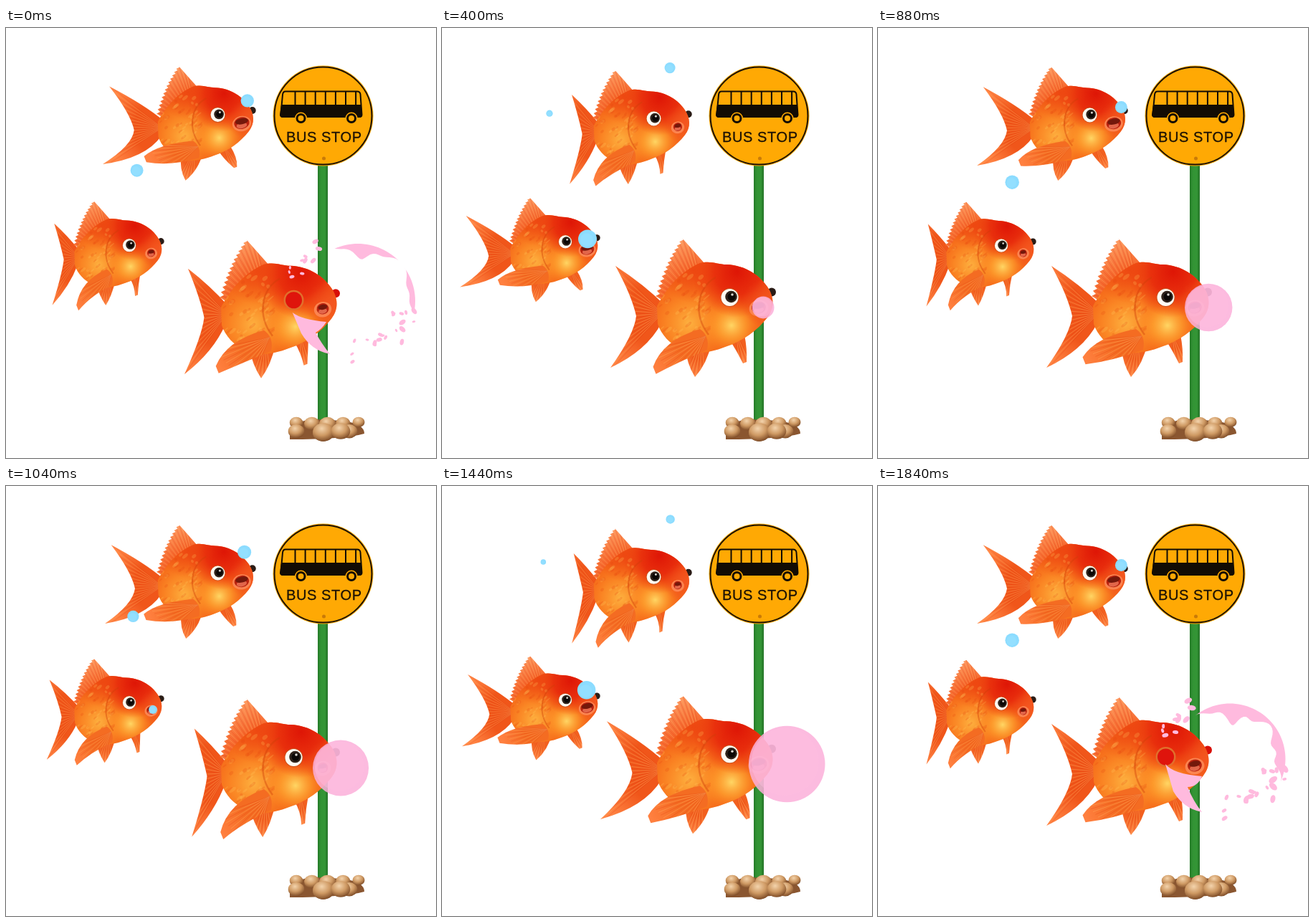
Recreate the animation shown at these times as an HTML page with a canvas. Size 600 px wide and 600 px high, loop 1.92 s.

```html
<!DOCTYPE html>
<html lang="en">
<head>
<meta charset="utf-8">
<title>Goldfish at the bus stop</title>
<style>
  html, body { margin: 0; width: 100%; height: 100%; overflow: hidden; background: #fff; }
  svg, canvas { position: absolute; left: 0; top: 0; width: 600px; height: 600px; }
  text { font: 20px "Liberation Sans", Arial, sans-serif; letter-spacing: .6px; }
</style>
</head>
<body>
<svg viewBox="0 0 600 600">
  <defs>
    <linearGradient id="green">
      <stop offset="0" stop-color="#257a28"/>
      <stop offset=".3" stop-color="#329334"/>
      <stop offset=".7" stop-color="#349636"/>
      <stop offset="1" stop-color="#227025"/>
    </linearGradient>
    <radialGradient id="stone" cx=".42" cy=".3" r=".75">
      <stop offset="0" stop-color="#f3d3ac"/>
      <stop offset=".5" stop-color="#cf9a64"/>
      <stop offset="1" stop-color="#74421f"/>
    </radialGradient>
  </defs>
  <rect x="435" y="190" width="14" height="362" fill="url(#green)"/>
  <g id="rocks" fill="url(#stone)"></g>
  <circle cx="442.5" cy="122.5" r="70" fill="#ffa904"/>
  <circle cx="442.5" cy="122.5" r="68" fill="none" stroke="#1c1204" stroke-width="2"/>
  <g fill="none" stroke="#120c04" stroke-width="2">
    <path d="M390 88.500H490q4 0 4.500 4L496.500 121q0 3-4 3H387q-4 0-3.500-4L386 93q.5-4.500 4-4.500Z"/>
    <path d="M384 107H495.500L497 122q0 3-4 3H386q-4 0-4-4Z" fill="#120c04" stroke="none"/>
    <path id="windows"/>
  </g>
  <g id="wheels" fill="#ffa904" stroke="#120c04"></g>
  <text x="391" y="158.500" fill="#1c1204" stroke="#1c1204" stroke-width=".3">BUS STOP</text>
  <circle cx="443.500" cy="182" r="2.500" fill="#c97a08"/>
</svg>
<canvas id="stage" width="600" height="600"></canvas>
<script>
const LOOP = 1920, STEP = 80, BEAT = 960, TAU = Math.PI * 2;
const ctx = document.getElementById('stage').getContext('2d');
const wave = t => Math.cos(TAU * t / BEAT);
const put = (id, html) => { document.getElementById(id).innerHTML = html; };

function seeded(seed) {
  return (low = 0, high = 1) => {
    seed = (seed * 16807) % 2147483647;
    return low + (high - low) * seed / 2147483647;
  };
}

function rockRow(y, from, to, count, size) {
  let row = '';
  for (let i = 0; i < count; i++) {
    const x = from + (to - from) * i / (count - 1);
    const r = size - Math.abs(x - 443) / 14;
    row += `<ellipse cx="${x}" cy="${y - Math.abs(x - 443) / 16}" rx="${r}" ry="${r * .85}"/>`;
  }
  return row;
}
put('rocks', '<path d="M396 568Q404 546 430 546L470 548Q500 552 500 566Q470 574 396 574Z" fill="#8a5630"/>' +
  rockRow(553, 405, 492, 5, 12) + rockRow(565, 405, 479, 3, 14) + rockRow(564, 443, 467, 2, 15));

let bars = '';
for (let i = 0; i < 7; i++) bars += `M${403.5 + i * 14.1} 88V108`;
document.getElementById('windows').setAttribute('d', bars);
put('wheels', [411.5, 482].map(x =>
  `<circle cx="${x}" cy="126" r="8.500" stroke="none"/><circle cx="${x}" cy="126" r="5.500" stroke-width="3"/>`).join(''));

// All fish share one drawing, laid out around an eye at EYE.
const EYE = [401.5, 376];
const school = [
  { x: 295.5, y: 124, size: .825, peak: 0 },
  { x: 172, y: 301, size: .755, peak: 400 },
  { x: 401.5, y: 376, size: 1, peak: 640 },
];
const body = new Path2D('M300 388C311 367 330 341 360 328C375 324 385 330 397 330C424 331 444 346 454 361' +
  'C463 374 465 390 454 404C440 422 420 437 395 445C375 453 350 457 335 449C318 441 306 428 301 413Z');
const dorsal = new Path2D(dorsalPath());

function dorsalPath() {
  let d = 'M366 328Q350 310 335 293';
  for (let i = 1; i <= 13; i++) {
    const s = i / 13, r = 1 - s;
    const x = r * r * 335 + 2 * r * s * 310 + s * s * 298;
    const y = r * r * 293 + 2 * r * s * 327 + s * s * 374;
    d += `L${x + 6} ${y - 3}L${x} ${y}`;
  }
  return d + 'L308 380L345 350Z';
}

function disc(x, y, r, color) {
  ctx.fillStyle = color;
  ctx.beginPath();
  ctx.arc(x, y, Math.max(r, 0), 0, TAU);
  ctx.fill();
}

function oval(x, y, rx, ry, turn, color) {
  ctx.fillStyle = color;
  ctx.beginPath();
  ctx.ellipse(x, y, rx, ry, turn, 0, TAU);
  ctx.fill();
}

function glow(x, y, r, ...stops) {
  const g = ctx.createRadialGradient(x, y, 0, x, y, r);
  stops.forEach((c, i) => g.addColorStop(i / (stops.length - 1), c));
  return g;
}

// A fin with rays running from its root to points between two edges.
function fin(path, [rx, ry], reach, a, b, rays, inner = '#f2601f', outer = '#ff8a4a') {
  ctx.save();
  ctx.fillStyle = glow(rx, ry, reach, inner, inner, outer);
  ctx.fill(path);
  ctx.clip(path);
  ctx.lineWidth = 1;
  for (let i = 0; i <= rays; i++) {
    const s = i / rays;
    ctx.strokeStyle = i % 2 ? 'rgba(255,190,110,.35)' : 'rgba(220,60,14,.3)';
    ctx.beginPath();
    ctx.moveTo(rx, ry);
    ctx.lineTo(a[0] + (b[0] - a[0]) * s, a[1] + (b[1] - a[1]) * s);
    ctx.stroke();
  }
  ctx.restore();
}

function drawTail(u) {
  const up = [242 - 24 * u, 332 - 4 * u], low = [235 - 28 * u, 474 - 14.5 * u], notch = 271 - 11 * u;
  fin(new Path2D(`M310 386Q${282 - 6 * u} 358 ${up}Q${notch - 6} 374 ${notch} 402` +
    `Q${notch - 3} 428 ${low}Q${286 - 7 * u} 450 306 412Z`),
    [308, 398], 95, [up[0] - 8, up[1] - 8], [low[0] - 8, low[1] + 12], 26, '#f0561a', '#ff8444');
}

function drawBody() {
  const random = seeded(11);
  ctx.save();
  ctx.fillStyle = '#f4661a';
  ctx.fill(body);
  ctx.clip(body);
  const shade = (...spot) => { ctx.fillStyle = glow(...spot); ctx.fillRect(290, 315, 185, 150); };
  shade(345, 412, 62, 'rgba(255,190,70,.85)', 'rgba(255,160,45,.55)', 'rgba(255,140,30,0)');
  shade(404, 415, 40, 'rgba(255,214,100,1)', 'rgba(255,170,50,.65)', 'rgba(255,140,30,0)');
  shade(412, 340, 64, 'rgba(222,22,6,1)', 'rgba(230,36,10,.85)', 'rgba(235,50,10,0)');
  shade(350, 338, 46, 'rgba(235,60,14,.7)', 'rgba(235,60,14,0)');
  shade(452, 384, 34, 'rgba(244,84,34,.9)', 'rgba(240,74,26,0)');
  for (let i = 0; i < 70; i++) {
    oval(random(305, 372), random(345, 440), random(2, 6), random(1, 3), -.7,
      i % 2 ? 'rgba(255,205,95,.22)' : 'rgba(222,62,12,.2)');
  }
  ctx.strokeStyle = 'rgba(205,60,8,.4)';
  ctx.lineWidth = 2.5;
  ctx.stroke(new Path2D('M382 348C356 362 350 400 372 428'));
  ctx.restore();
}

function drawMouth(open) {
  const part = (dy, rx, ry, color) => oval(442, 390 + dy, rx, ry, -.2, color);
  part(1, 11 + 5 * open, 10 + 3 * open, '#fb8450');
  part(0, 7 + 6 * open, 7 + 3 * open, '#b8220f');
  part(3 + open, 5 + 4 * open, 3 + 2 * open, '#e2664a');
  part(-2 - open, 5 + 6 * open, 3 + 2 * open, '#74180b');
}

function drawEye(shut) {
  const [x, y] = EYE;
  if (shut) {
    disc(x, y + 2, 14, '#e0702c');
    disc(x, y + 2, 11.5, '#df140c');
    return;
  }
  disc(x, y, 13, '#c9521c');
  disc(x, y, 12, '#fffaf2');
  disc(x + 2, y - 1, 8.3, '#30231b');
  disc(x + 2.5, y - 1, 5.5, '#0c0806');
  disc(x + 3.5, y - 4, 1.8, '#d8d2cc');
}

function drawFish({ x, y, size, peak }, t, shut) {
  const u = wave(t - peak), v = wave(t - peak - 50);
  ctx.save();
  ctx.translate(x, y);
  ctx.scale(size, size);
  ctx.translate(-EYE[0], -EYE[1] - 3.5 * u);

  drawTail(u);
  fin(dorsal, [372, 400], 120, [345, 280], [280, 372], 28, '#f45c20', '#ffa36c');

  const side = [425 + 9 * u, 466 - 2 * u];
  fin(new Path2D(`M402 436Q412 452 ${side[0] - 5} ${side[1] + 2}L${side}Q${side[0] + 1} 448 422 428Z`),
    [410, 425], 46, [side[0] - 12, side[1] + 4], [side[0] + 6, side[1]], 6);
  const low = [353 - 6 * u, 487];
  fin(new Path2D(`M340 446Q${341 - 5 * u} 468 ${low}Q370 468 376 440Z`),
    [362, 435], 55, [low[0] - 16, low[1]], [low[0] + 14, low[1]], 9);

  disc(460, 368.5, 6, shut ? '#d80f08' : '#2a1c16');
  drawBody();

  const tip = [291 - 14 * v, 472 - 21 * v];
  fin(new Path2D(`M360 420Q${306 - 6 * v} ${433 - 8 * v} ${tip[0] - 1} ${tip[1] - 6}L${tip[0] + 3} ${tip[1] + 4}` +
    `Q${327 - 3 * v} ${466 - 3 * v} 370 449Q374 430 360 420Z`),
    [368, 430], 85, [tip[0] - 4, tip[1] - 30], [tip[0] + 45, tip[1] + 24], 14, '#f46c22', '#ff8040');

  drawMouth((1 + u) / 2);
  drawEye(shut);
  ctx.restore();
}

function bubble(x, y, r) {
  disc(x, y, r, '#8cdcff');
  disc(x - r * .1, y + r * .1, r * .7, '#93dfff');
}

// Sways while it rises.
function topBubble(age) {
  const s = (age - 640) / 1040;
  if (s < 0 || s > 1) return;
  bubble(329 - 11 * Math.cos(Math.PI * (age - 1380) / 560), 138 - 119 * s, 9.6 * Math.sin(Math.PI * (.16 + .8 * s)));
}

// Swells in the mouth, then drifts off to the left.
function leftBubble(age) {
  const s = (age - 80) / 1600;
  if (s < 0 || s > 1) return;
  const rise = (1 - Math.cos(2.7 * s)) / (1 - Math.cos(2.7));
  bubble(205 - 94 * s ** 2.4, 312 - 236 * rise, 13 * Math.sin(Math.PI * (.15 + .82 * Math.sqrt(s))));
}

function drawGum(t) {
  const r = .039 * t - 1.4e-6 * t * t;
  const x = Math.max(428 + r, 442 + .4 * r), y = 390 - 4 * wave(t - 640);
  disc(x, y, r, 'rgba(252,176,218,.86)');
  disc(x - r * .05, y - r * .06, r * .88, 'rgba(255,190,226,.4)');
}

// Two swellings of a ring that wear away as k grows, plus scattered scraps.
function drawBurst(k) {
  const random = seeded(29), size = 1.25 - .22 * k;
  const at = (deg, r) => {
    const a = deg * Math.PI / 180;
    return [491 + r * Math.cos(a), 381 + r * Math.sin(a)];
  };
  const hump = (deg, mid, width) => Math.exp(-(((deg - mid) / width) ** 2) / 2);
  const thick = deg => Math.max(0, (34 * hump(deg, -82, 24) + 26 * hump(deg, -8, 18) + 2 - 8 * k) *
    (.85 + .25 * Math.sin(deg / 5)));
  const radius = 75 + 2.5 * k;

  ctx.fillStyle = '#ffbade';
  ctx.beginPath();
  for (let deg = -135; deg <= 45; deg += 3) ctx.lineTo(...at(deg, radius));
  for (let deg = 45; deg >= -135; deg -= 3) ctx.lineTo(...at(deg, radius - thick(deg)));
  ctx.fill();

  const scatter = (count, from, to, near, far) => {
    for (let i = 0; i < count; i++) {
      const [x, y] = at(random(from, to), random(near, far) + 2 * k), r = random(2, 5) * size;
      oval(x, y, r * 1.3, r * .8, random(0, 3), '#ffbade');
    }
  };
  scatter(20, 10, 105, 48, 82);
  scatter(10, 200, 235, 75, 105);

  const thin = 5 * (k - 1);
  ctx.fill(new Path2D(`M${401 - thin / 4} ${388 + thin * 1.8}Q412 ${402 + thin} ${452 - thin} ${405 + thin}` +
    `Q${446 - thin} 420 432 ${420 + thin}Q440 440 452 455Q426 450 412 426Z`));
}

function draw(t) {
  const sinceBurst = (t - 1760 + LOOP) % LOOP / STEP;
  const burst = sinceBurst < 4;
  ctx.clearRect(0, 0, 600, 600);
  school.forEach((f, i) => drawFish(f, t, burst && i === 2));
  for (const age of [t % BEAT, t % BEAT + BEAT]) {
    topBubble(age);
    leftBubble(age);
  }
  if (burst) drawBurst(sinceBurst);
  else drawGum(t);
}

const start = performance.now();
let shown = -1;
function tick() {
  const t = Math.floor((performance.now() - start) % LOOP / STEP) * STEP;
  if (t !== shown) draw(shown = t);
  requestAnimationFrame(tick);
}
tick();
</script>
</body>
</html>
```
